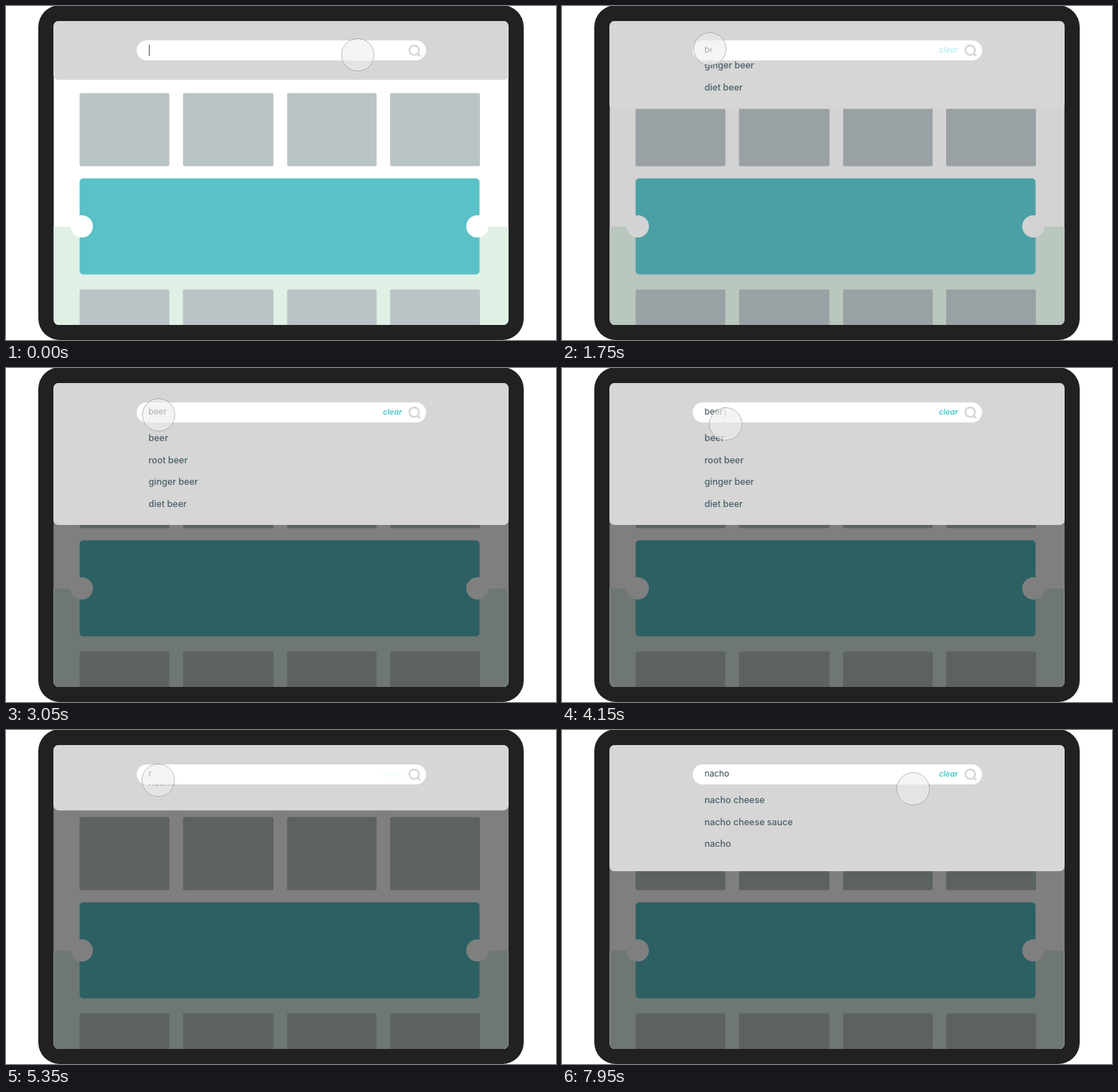
Write an HTML page with a canvas that moves like this. It is 766 px wide and 466 px high and loops after 8 s.

```html
<!DOCTYPE html>
<html lang="en">
<head>
<meta charset="utf-8">
<title>Search suggestions</title>
<style>
  html, body { margin: 0; width: 100%; height: 100%; overflow: hidden; background: #fff; }
  canvas { display: block; }
</style>
</head>
<body>
<canvas id="stage" width="766" height="466"></canvas>
<script>
const ctx = document.getElementById('stage').getContext('2d');
const LOOP = 8000;
const CLOSED = 103;
const BEER = { word: 'beer', bottom: 219, caret: 27.5, rows: ['beer', 'root beer', 'ginger beer', 'diet beer'] };
const NACHO = { word: 'nacho', bottom: 197, caret: 38.5, rows: ['nacho cheese', 'nacho cheese sauce', 'nacho'] };

// Pointer moves: start, end, target x, target y
const MOVES = [
  [0, 850, 206, 60],
  [2700, 3650, 228, 78],
  [4250, 4650, 212, 70],
  [6250, 7100, 489, 82]
];

const clamp = v => Math.max(0, Math.min(1, v));
const lerp = (a, b, k) => a + (b - a) * k;
const ease = (t, start, end) => (1 - Math.cos(Math.PI * clamp((t - start) / (end - start)))) / 2;

function box(x1, y1, x2, y2, radius, color) {
  ctx.beginPath();
  ctx.roundRect(x1, y1, x2 - x1, y2 - y1, radius);
  ctx.fillStyle = color;
  ctx.fill();
}

function circle(x, y, r, fill, stroke, width = 1) {
  ctx.beginPath();
  ctx.arc(x, y, r, 0, Math.PI * 2);
  if (fill) { ctx.fillStyle = fill; ctx.fill(); }
  if (stroke) { ctx.strokeStyle = stroke; ctx.lineWidth = width; ctx.stroke(); }
}

function label(text, x, y, size, color, style = '500') {
  ctx.font = `${style} ${size}px Inter, sans-serif`;
  ctx.fillStyle = color;
  ctx.fillText(text, x, y);
}

// Runs a drawing step inside a rectangular clip with its own opacity
function within(x, y, w, h, alpha, draw) {
  ctx.save();
  ctx.beginPath();
  ctx.rect(x, y, w, h);
  ctx.clip();
  ctx.globalAlpha = alpha;
  draw();
  ctx.restore();
}

function drawPage(dim) {
  box(45, -1, 721, 466, 30, '#212121');
  ctx.save();
  box(66.5, 21, 699.7, 445, 7, '#fff');
  ctx.clip();
  ctx.fillStyle = '#dff0e5';
  ctx.fillRect(66, 308, 634, 137);
  for (const [left, right] of [[102.5, 227.5], [246.5, 372.5], [391.5, 516.2], [535, 660]]) {
    box(left, 121.5, right, 223.5, 2, '#bac3c6');
    box(left, 395.5, right, 460, 2, '#bac3c6');
  }
  box(102.5, 240.5, 659.5, 374.5, 5, '#5ac1c8');
  circle(105.5, 307.5, 15.5, '#fff');
  circle(656.5, 307.5, 15.5, '#fff');
  ctx.fillStyle = `rgba(0,0,0,${dim})`;
  ctx.fillRect(66, 21, 634, 424);
  ctx.restore();
}

function drawList(list, shift, alpha) {
  within(66, 76, 634, 369, alpha, () => {
    list.rows.forEach((row, i) => label(row, 198.5, 102 + i * 30.5 - shift, 12.5, '#4a5f68'));
  });
}

function drawBar(list, shown, caretAlpha) {
  box(182, 48, 585, 76, 14, '#fff');
  circle(568.5, 61.6, 6.7, null, '#d6d6d6', 2.5);
  ctx.beginPath();
  ctx.moveTo(573.2, 66.3);
  ctx.lineTo(577, 70.2);
  ctx.stroke();
  within(182, 48, 16.5 + shown * list.caret, 28, 1, () => label(list.word, 198.5, 65.3, 11.8, '#35474f', '400'));
  within(500, 48, 60, 28, shown, () => label('clear', 525, 65.3, 11, '#2bc0c6', 'italic 500'));
  ctx.fillStyle = `rgba(55,65,70,${caretAlpha})`;
  ctx.fillRect(199 + shown * list.caret, 54, 1, 16);
}

function drawPointer(t) {
  let x = 490, y = 68;
  for (const [start, end, toX, toY] of MOVES) {
    const k = ease(t, start, end);
    x = lerp(x, toX, k);
    y = lerp(y, toY, k);
  }
  const press = Math.sin(Math.PI * clamp((t - 925) / 550));
  const r = 22.5 * (1 - 0.06 * press);
  circle(x, y, r, 'rgba(238,238,238,.62)');
  circle(x, y, r - 1, null, 'rgba(255,255,255,.6)');
  circle(x, y, r, null, 'rgba(120,120,120,.65)', 0.8);
}

function render(t) {
  const openBeer = ease(t, 1550, 2050);
  const closeBeer = ease(t, 4650, 5150);
  const openNacho = ease(t, 5250, 5750);
  const second = t >= 5200;
  const list = second ? NACHO : BEER;
  const open = second ? openNacho : openBeer * (1 - closeBeer);
  const bottom = lerp(CLOSED, list.bottom, open);

  ctx.clearRect(0, 0, 766, 466);
  drawPage(0.5 * openBeer);
  box(66, 21, 700, bottom, 7, '#d6d6d6');

  // Suggestions slide down with the panel, but fade out with a short lift
  const closing = !second && closeBeer > 0;
  const shift = closing ? 20 * closeBeer : list.bottom - bottom;
  const listAlpha = closing ? 1 - closeBeer : open > 0 ? 1 : 0;
  drawList(list, shift, listAlpha);

  const shown = closing ? clamp(1 - closeBeer * 1.1) : open;
  const typing = (second || !closing) && open > 0 && open < 1;
  const blink = clamp(0.5 + 0.8 * Math.cos(2 * Math.PI * (t - 6250) / 1210));
  drawBar(list, shown, typing ? 0 : blink);
  drawPointer(t);
}

function frame() {
  render(performance.now() % LOOP);
  requestAnimationFrame(frame);
}
frame();
</script>
</body>
</html>
```
